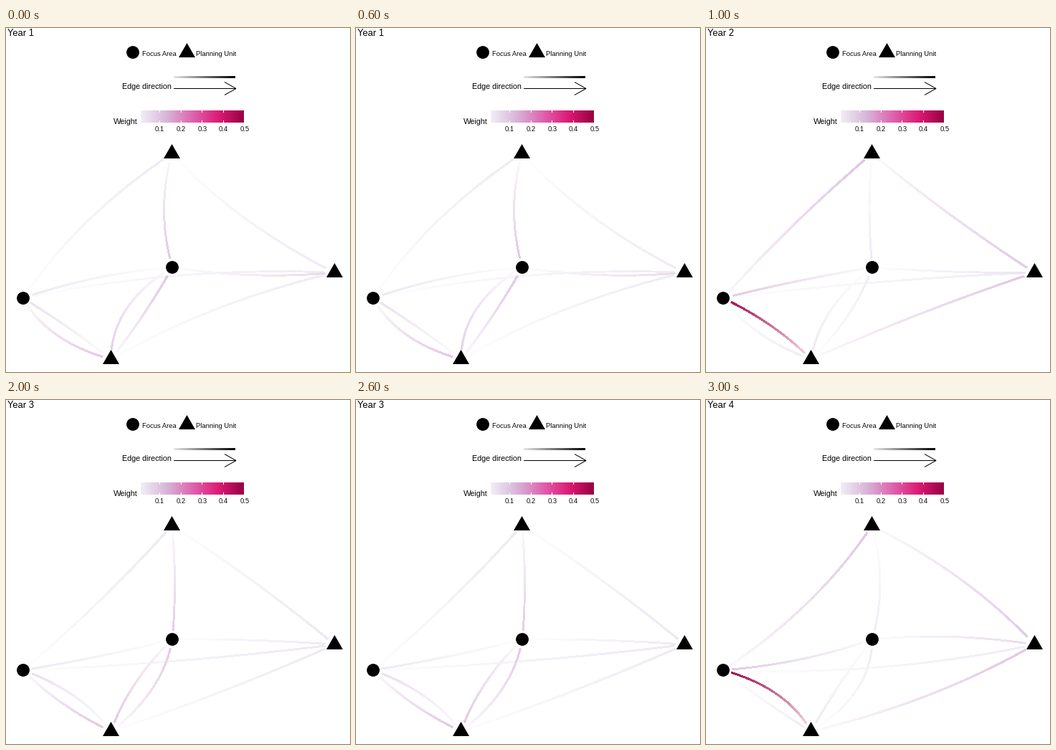
Write a matplotlib script that moves like this. It is 480 by 480 pixels and loops after 4 s.

```python
import numpy as np
import matplotlib.pyplot as plt
from matplotlib.animation import FuncAnimation
from matplotlib.collections import LineCollection
from matplotlib.colors import LinearSegmentedColormap
from matplotlib.patches import Circle, Polygon

plt.rcParams.update({
    "font.family": "Liberation Sans",
    "text.hinting": "native",
    "toolbar": "None",
})

SIZE = 480
DPI = 72            # one point equals one pixel
ASPECT = 1.5        # horizontal over vertical data scale
FAN_STEPS = 16
NODE_GAP = 12
W_MIN, W_MAX = 0.014, 0.497
SMALL, MEDIUM, LARGE = 9.4, 10.7, 13

PURD = LinearSegmentedColormap.from_list(
    "purd", ["#F1EEF6", "#D7B5D8", "#DF65B0", "#DD1C77", "#980043"])

NODES = {
    "A": (231.5, 175.3),
    "B": (232.0, 334.0),
    "C": (24.0, 377.0),
    "D": (146.5, 462.3),
    "E": (458.5, 341.3),
}

# start, end, side of the first bend, fan position in year 1, weight per year
EDGES = [
    ("C", "E", 1, 1.5, (0.022, 0.022, 0.030, 0.020)),
    ("C", "A", 1, 1.5, (0.025, 0.105, 0.028, 0.100)),
    ("A", "E", -1, 1.5, (0.025, 0.095, 0.030, 0.095)),
    ("D", "E", 1, 1.5, (0.025, 0.100, 0.028, 0.100)),
    ("B", "C", -1, 1.5, (0.030, 0.095, 0.028, 0.095)),
    ("B", "E", -1, 1.5, (0.060, 0.040, 0.028, 0.055)),
    ("A", "B", -1, 1.5, (0.100, 0.024, 0.095, 0.020)),
    ("C", "D", -1, 3.5, (0.100, 0.020, 0.100, 0.020)),
    ("B", "D", -1, 3.5, (0.085, 0.028, 0.100, 0.026)),
    ("D", "B", 1, -0.5, (0.105, 0.022, 0.100, 0.024)),
    ("D", "C", 1, -0.5, (0.045, 0.490, 0.050, 0.490)),
]


def fade(rgb, along):
    """Blend a colour over white, from faint at the start to full at the end."""
    alpha = (0.1 + 0.9 * np.asarray(along))[:, None]
    return 1 - alpha * (1 - np.asarray(rgb)[:3])


def weight_color(weight):
    return PURD((weight - W_MIN) / (W_MAX - W_MIN))


def edge_path(start, end, position, steps=90):
    """Segments of a fanned quadratic curve, cut off near both nodes."""
    p, q = np.array(NODES[start]), np.array(NODES[end])
    dx, dy = q - p
    bend = np.array([dy * ASPECT, -dx / ASPECT]) / FAN_STEPS
    control = (p + q) / 2 + position * bend
    t = np.linspace(0, 1, steps)[:, None]
    curve = (1 - t) ** 2 * p + 2 * t * (1 - t) * control + t ** 2 * q
    clear = np.minimum(np.hypot(*(curve - p).T),
                       np.hypot(*(curve - q).T)) > NODE_GAP
    curve, t = curve[clear], t[clear, 0]
    return np.stack([curve[:-1], curve[1:]], axis=1), t[:-1]


def edges_in_year(year):
    segments, colors = [], []
    for start, end, side, first, weights in EDGES:
        path, along = edge_path(start, end, side * (first - year))
        segments.append(path)
        colors.append(fade(weight_color(weights[year]), along))
    return np.concatenate(segments), np.concatenate(colors)


fig = plt.figure(figsize=(SIZE / DPI, SIZE / DPI), dpi=DPI, facecolor="white")
ax = fig.add_axes([0, 0, 1, 1])
ax.axis("off")


def label(x, baseline, text, size, ha="left"):
    return ax.text(x, baseline, text, fontsize=size, ha=ha, va="baseline")


def circle(x, y):
    ax.add_patch(Circle((x, y), 8.9, color="black", lw=0, zorder=5))


def triangle(x, y):
    corners = [(x, y - 13.3), (x + 11.5, y + 6.7), (x - 11.5, y + 6.7)]
    ax.add_patch(Polygon(corners, color="black", lw=0, zorder=5))


def line(xs, ys, color):
    ax.plot(xs, ys, color=color, lw=1, snap=False, solid_capstyle="butt",
            solid_joinstyle="miter")


def ramp(colors, left, right, top, bottom):
    ax.imshow(colors[None], extent=(left, right, bottom, top),
              aspect="auto", interpolation="nearest")


def draw_legend():
    circle(177, 34)
    label(190, 39, "Focus Area", SMALL)
    triangle(252.5, 34.3)
    label(265, 39, "Planning Unit", SMALL)

    label(162, 85, "Edge direction", MEDIUM)
    ramp(fade((0, 0, 0), np.linspace(0, 1, 86)), 234, 320, 67, 70)
    line([234, 321], [84.5, 84.5], "black")
    line([305, 321, 305], [75.5, 84.5, 93.5], "black")

    label(150, 134, "Weight", MEDIUM)
    ramp(PURD(np.linspace(0, 1, 144))[:, :3], 188, 332, 115, 132)
    for i in range(5):
        x = 214.5 + 29.6 * i
        label(x, 144, f"0.{i + 1}", SMALL, ha="center")
        tick = int(x) + 0.5
        if tick < 332:
            line([tick, tick], [115, 118], "white")
            line([tick, tick], [129, 132], "white")


draw_legend()
for name, (x, y) in NODES.items():
    (circle if name in "BC" else triangle)(x, y)

title = label(2, 11, "", LARGE)
# Hard-edged strokes fill every touched pixel, so this shows about 3 px wide.
links = LineCollection([], linewidths=1.9, antialiaseds=False,
                       capstyle="butt", zorder=2)
ax.add_collection(links, autolim=False)
ax.set(xlim=(0, SIZE), ylim=(SIZE, 0))


def update(year):
    segments, colors = edges_in_year(year)
    links.set_segments(segments)
    links.set_color(colors)
    title.set_text(f"Year {year + 1}")
    return links, title


anim = FuncAnimation(fig, update, frames=4, interval=1000, repeat=True,
                     repeat_delay=0, blit=False)
plt.show()
```
